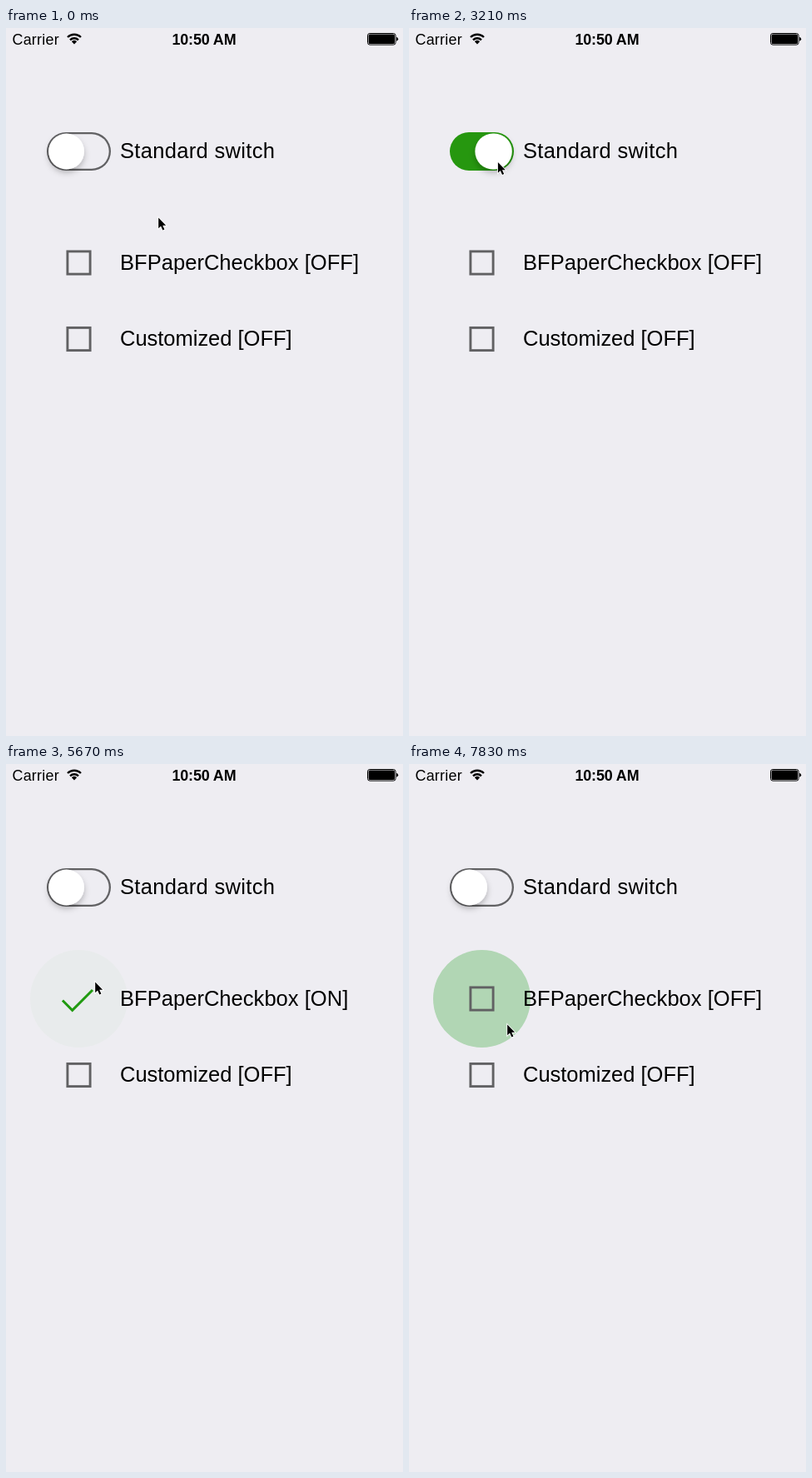
Recreate the animation shown at these times as an HTML page. Size 477 px wide and 849 px high, loop 8000 ms.

```html
<!DOCTYPE html>
<html lang="en">
<head>
<meta charset="utf-8">
<title>Switch and checkboxes</title>
<style>
  html, body { margin: 0; width: 100%; height: 100%; overflow: hidden; background: #eeedf2; }
  svg { display: block; width: 100vw; height: 100vh; }
  text { font-family: "Liberation Sans", Arial, sans-serif; font-size: 25.5px; }
  .bar { font-size: 17.9px; }
  .box { fill: none; stroke: #616163; stroke-width: 2.9; }
</style>
</head>
<body>
<svg viewBox="0 0 477 849" xmlns="http://www.w3.org/2000/svg">
  <defs>
    <filter id="shadow" filterUnits="userSpaceOnUse" x="25" y="105" width="125" height="95">
      <feDropShadow dx="0" dy="4" stdDeviation="3.6" flood-color="#000" flood-opacity=".25"/>
    </filter>
    <clipPath id="round"><circle cx="87.5" cy="281.5" r="58.5"/></clipPath>
  </defs>
  <rect width="477" height="849" fill="#eeedf2"/>

  <text class="bar" x="7.5" y="20" letter-spacing=".25">Carrier</text>
  <g fill="none" stroke="#000" stroke-width="2.4" transform="translate(0 -.6)">
    <path d="M74 11.6A11.6 11.6 0 0 1 90 11.6"/>
    <path d="M77 14.9A7.2 7.2 0 0 1 87 14.9"/>
    <path d="M82 20L78.9 16.8A4.5 4.5 0 0 1 85.1 16.8Z" fill="#000" stroke="none"/>
  </g>
  <text class="bar" x="199.4" y="20" font-weight="bold" letter-spacing="-.1">10:50 AM</text>
  <rect x="434.5" y="6.5" width="33.6" height="13.6" rx="2.6" fill="none" stroke="#000"/>
  <rect x="435.6" y="7.6" width="31.4" height="11.4" rx="1.6"/>
  <path d="M469.2 10.8Q471.2 11.4 471.2 13.3T469.2 15.8Z"/>

  <rect id="track" x="49" y="125" width="77" height="46" rx="23"/>
  <rect id="hole" fill="#eeedf2"/>
  <rect id="knob" y="126.6" height="42.8" rx="21.4" fill="#fff" filter="url(#shadow)"/>

  <g clip-path="url(#round)"><circle id="ripple"/></g>
  <rect id="box" class="box" x="-13.6" y="-13.6" width="27.2" height="27.2"/>
  <path id="check" fill="none" stroke="#209a10" stroke-width="3"/>
  <rect class="box" x="73.9" y="359.4" width="27.2" height="27.2"/>

  <text x="137" y="156" letter-spacing=".32">Standard switch</text>
  <text id="label" x="137" y="289.6" letter-spacing=".04"></text>
  <text x="137" y="381"  letter-spacing="-.02">Customized [OFF]</text>

  <g id="cursor">
    <path d="M0 0V14.6L3.3 11.5L5.9 17.2L8.3 16.1L5.8 10.6H10.3Z" transform="translate(.9 1.6) scale(.87)" stroke="#fff" stroke-width="2" paint-order="stroke"/>
  </g>
</svg>
<script>
const LOOP = 8000;
const $ = id => document.getElementById(id);
const set = (el, attrs) => { for (const k in attrs) el.setAttribute(k, attrs[k]); };
const mix = (a, b, u) => a + (b - a) * u;
const span = (t, start, length) => Math.min(1, Math.max(0, (t - start) / length));
const easeOut = u => 1 - (1 - u) ** 2;

// start, end, x, y
const moves = [
  [570, 960, 109, 172], [960, 1210, 84.8, 160.5],
  [2590, 2820, 105, 160], [2940, 2970, 106, 159.5],
  [4130, 4630, 106.3, 260], [5690, 6240, 64.3, 309], [7230, 7620, 117.3, 311]
];
// press, release, x, y, colour
const touches = [
  [4800, 5440, 106, 263, '#b1d6b4'],
  [6297, 6990, 65, 312, '#d9d9dd'],
  [7638, 9000, 118, 314, '#b1d6b4']
];

function spring(t, start) {
  const s = Math.max(0, t - start) / 1000, w = 17, k = 17.8;
  return 1 - Math.exp(-k * s) * (Math.cos(w * s) + k / w * Math.sin(w * s));
}

function drawCursor(t) {
  let x = 182.3, y = 226;
  for (const [a, b, tx, ty] of moves) {
    const u = 1 - (1 - span(t, a, b - a)) ** 1.25;
    x = mix(x, tx, u);
    y = mix(y, ty, u);
  }
  set($('cursor'), { transform: `translate(${x} ${y})` });
}

function drawSwitch(t) {
  const on = spring(t, 2040) - spring(t, 3800);
  const stretch = easeOut(span(t, 1330, 300)) - spring(t, 2040)
    + easeOut(span(t, 3180, 290)) - spring(t, 3800);
  const width = 42.8 + 8 * stretch;
  set($('knob'), { x: mix(51.2, 123.8 - width, on), width });

  const green = span(t, 2040, 110) - span(t, 3800, 120);
  const tone = [[97, 38], [97, 151], [99, 15]].map(([a, b]) => Math.round(mix(a, b, green)));
  set($('track'), { fill: `rgb(${tone})` });

  const closed = easeOut(span(t, 1330, 320)) - easeOut(span(t, 3800, 300));
  const inset = mix(2.3, 23, closed);
  set($('hole'), {
    x: 49 + inset, y: 125 + inset, width: 77 - 2 * inset,
    height: 46 - 2 * inset, rx: 23 - inset
  });
}

function drawCheckbox(t) {
  const [press, release, cx, cy, fill] = touches.findLast(p => t >= p[0]) || touches[0];
  set($('ripple'), {
    cx, cy, fill,
    r: Math.min(125, Math.max(0, t - press) * 0.7),
    opacity: 1 - span(t, release, 260)
  });

  const hidden = span(t, 5440, 120) - span(t, 7110, 120);
  const drawn = span(t, 5560, 120) - span(t, 6990, 120);
  set($('box'), {
    transform: `translate(${mix(87.5, 80, hidden)} ${mix(281.5, 294, hidden)}) rotate(${45 * hidden}) scale(${1 - hidden})`
  });
  const px = 79.7, py = 295.3;
  set($('check'), {
    d: `M${mix(px, 67, drawn)} ${mix(py, 282.6, drawn)}L${px} ${py}L${mix(px, 106, drawn)} ${mix(py, 269, drawn)}`,
    visibility: drawn > 0 ? 'visible' : 'hidden'
  });
  $('label').textContent = `BFPaperCheckbox [${t >= 5440 && t < 6990 ? 'ON' : 'OFF'}]`;
}

function render(t) {
  drawSwitch(t);
  drawCheckbox(t);
  drawCursor(t);
}

const begin = performance.now();
function tick() {
  render((performance.now() - begin) % LOOP);
  requestAnimationFrame(tick);
}
tick();
</script>
</body>
</html>
```
